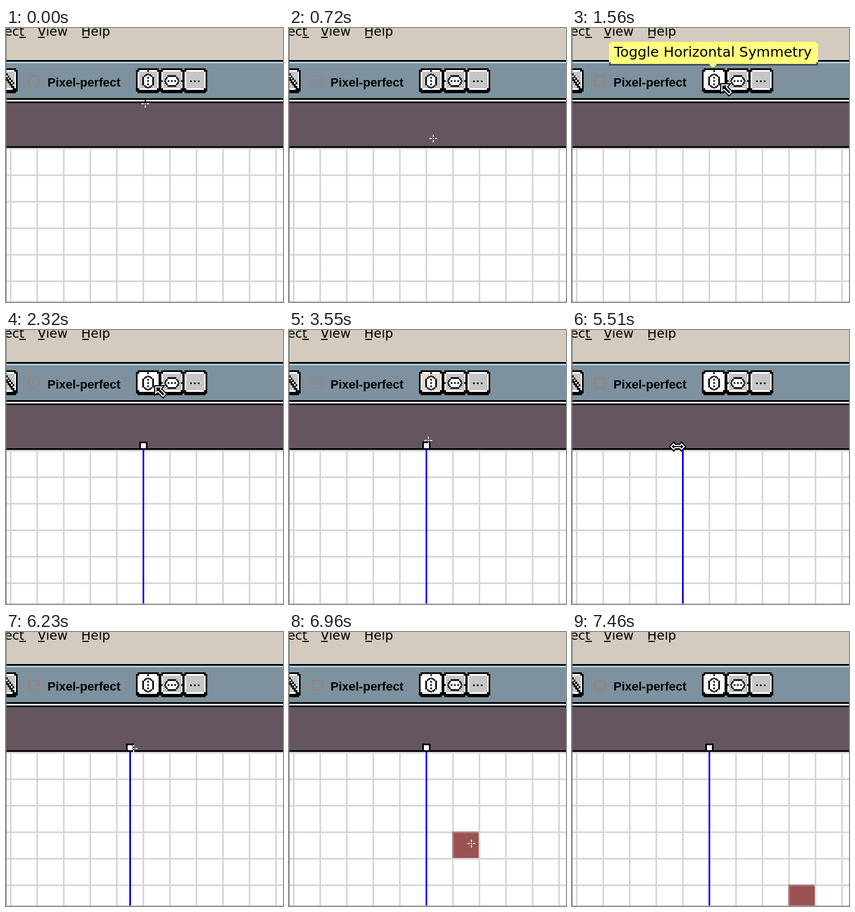
Write an HTML page with a canvas that moves like this. It is 501 px wide and 496 px high and loops after 8240 ms.

```html
<!DOCTYPE html>
<html lang="en">
<head>
<meta charset="utf-8">
<title>Symmetry line</title>
<style>
html, body { margin: 0; width: 100%; height: 100%; overflow: hidden; }
canvas { display: block; }
</style>
</head>
<body>
<canvas id="stage" width="501" height="496"></canvas>
<script>
const W = 501, H = 496, LOOP = 8240, TICK = 120, CELL = 48, TOP = 217;
const g = document.getElementById('stage').getContext('2d');

// Each gesture eases the pointer from where it was to `to`, swinging out by `bend` on the way.
const gestures = [
  { start: 0, ticks: 1, to: [252, 137] },
  { start: 120, ticks: 7, to: [224, 168], bend: [193, 175] },
  { start: 960, ticks: 6, to: [268, 100] },
  { start: 2320, ticks: 1, to: [268, 100] },
  { start: 2570, ticks: 1, to: [268, 100] },
  { start: 2950, ticks: 7, to: [252, 203] },
  { start: 3790, ticks: 1, to: [248, 206] },
  { start: 4170, ticks: 7, to: [348, 211], bend: [93, 0] },
  { start: 5010, ticks: 4, to: [198, 211] },
  { start: 5510, ticks: 7, to: [231, 211], bend: [-75, 0] },
  { start: 6350, ticks: 3, to: [246, 211] },
  { start: 6840, ticks: 4, to: [365, 454] },
  { start: 7340, ticks: 2, to: [425, 504] }
];

// Time of the latest tick and the pointer's place at it
function pointerAt(time) {
  const i = gestures.findLastIndex(m => m.start <= time);
  const { start, ticks, to, bend = [0, 0] } = gestures[i];
  const from = i ? gestures[i - 1].to : to;
  const step = Math.min(ticks - 1, Math.floor((time - start) / TICK));
  const k = (step + 1) / ticks;
  const ease = Math.sin(Math.PI * k / 2), swing = Math.sin(Math.PI * k) ** 2;
  const at = n => Math.round(from[n] + (to[n] - from[n]) * ease + bend[n] * swing);
  return { t: start + TICK * step, x: at(0), y: at(1) };
}

function rect(color, x, y, w, h) {
  g.fillStyle = color;
  g.fillRect(x, y, w, h);
}

// Box with 3 px notches at its corners
function notched(color, x, y, w, h) {
  rect(color, x + 3, y, w - 6, h);
  rect(color, x, y + 3, w, h - 6);
}

function text(str, x, y, font, align = 'left') {
  g.font = font;
  g.textAlign = align;
  g.fillStyle = '#000';
  g.fillText(str, x, y);
}

// Black shape with a white ring inside its black rim
function cursor(points, x, y) {
  g.beginPath();
  points.forEach(([px, py]) => g.lineTo(x + px, y + py));
  g.closePath();
  g.lineWidth = 6;
  g.strokeStyle = g.fillStyle = '#000';
  g.stroke();
  g.fill();
  g.lineWidth = 2;
  g.strokeStyle = '#fff';
  g.stroke();
}

function button(x, fill) {
  notched('#000', x, 73, 44, 45);
  notched('#fff', x + 3, 76, 38, 36);
  rect(fill, x + 6, 79, 33, 30);
}

// Split oval with a dotted axis; flip swaps the axes
function symmetryIcon(cx, cy, flip) {
  const dot = (color, x, y, w, h) => flip
    ? rect(color, cx + y - h / 2, cy + x - w / 2, h, w)
    : rect(color, cx + x - w / 2, cy + y - h / 2, w, h);
  dot('#fff', 0, 0, 19, 18);
  dot('#fff', 0, 0, 12, 24);
  for (const sx of [-1, 1]) {
    dot('#000', sx * 9, 0, 3, 16);
    for (const sy of [-1, 1]) {
      dot('#000', sx * 6, sy * 9, 3, 3);
      dot('#000', sx * 3.5, sy * 11, 3, 3);
    }
  }
  for (let d = -18; d <= 18; d += 6) dot('#000', 0, d, 3, 3);
}

function toolbar(fill) {
  rect('#d3cbbe', 0, 0, W, 58);
  const menu = '23px "DejaVu Sans", sans-serif';
  text('ect', 33, 14, menu, 'right');
  text('View', 57, 14, menu);
  text('Help', 136, 14, menu);
  for (const x of [24, 58, 138]) rect('#000', x, 16, 12, 2);

  rect('#000', 0, 58, W, 3);
  rect('#b0cde0', 0, 61, W, 3);
  rect('#7d929e', 0, 64, W, 63);
  rect('#000', 0, 127, W, 9);
  rect('#fff', 0, 130, W, 3);

  button(-23, '#c6c6c6');
  for (let i = 0; i < 5; i++) {
    rect('#000', 3 * i, 82 + 4 * i, 3, 14);
    rect('#fff', 3 * i, 86 + 4 * i, 3, 3);
  }

  notched('#9c8278', 40, 86, 21, 20);
  rect('#7d929e', 43, 89, 15, 14);
  text('Pixel-perfect', 75, 106, 'bold 22px "Liberation Sans", sans-serif');

  button(320, '#c6c6c6');
  button(278, '#c6c6c6');
  button(235, fill);
  symmetryIcon(257, 96, false);
  symmetryIcon(300, 96, true);
  for (let i = 0; i < 3; i++) rect('#000', 333 + 7 * i, 95, 3, 3);
}

function grid() {
  g.beginPath();
  for (let x = 7; x < W; x += CELL) g.rect(x, TOP, 3, H - TOP);
  for (let y = TOP; y < H; y += CELL) g.rect(0, y, W, 3);
  g.fillStyle = 'rgba(176,176,176,.5)';
  g.fill();
}

// Crosshair, black where it lies on the white stripe
function cross(x, y) {
  for (let d = -7; d < 7; d++) {
    const gap = Math.abs(d + 0.5);
    if (gap > 1 && gap < 3) continue;
    rect(y + d >= 127 && y + d < 134 ? '#000' : '#fff', x - 1, y + d, 2, 1);
    rect('#fff', x + d, y - 1, 1, 2);
  }
}

const arrow = [[3, 3], [14, 3], [11, 7], [20, 16], [16, 20], [7, 11], [3, 14]];
const half = [[-12, 0], [-7, -5], [-5, -2], [5, -2], [7, -5], [12, 0]];
const resize = [...half, ...half.slice(1, -1).map(([x, y]) => [-x, -y])];

function draw(time) {
  const { t, x, y } = pointerAt(time);
  const during = (from, to) => t >= from && t < to;
  const lineOn = t >= 2320;
  const dragging = during(4170, 6230) || during(6350, 6590);
  const resizing = during(3790, 6230) || during(6350, 6840);
  const lineX = during(4170, 6590) ? 8 + 24 * Math.round((x - 8) / 24) : 248;

  toolbar(during(2570, 4170) ? '#e6d9d0' : y < 118 || lineOn ? '#fff' : '#c6c6c6');
  rect('#655560', 0, 136, W, 78);
  rect('#000', 0, 214, W, 3);
  rect('#fff', 0, TOP, W, H - TOP);

  if (y >= TOP) {
    const snap = (v, from) => from + CELL * Math.floor((v - from) / CELL);
    rect('#9b5252', snap(x, 7), snap(y, TOP), CELL, CELL);
  }
  grid();
  rect('#b0b0b0', 0, 495, W, 1);
  rect('#6e6e6e', 0, 0, 1, H);

  if (lineOn) {
    rect('#00f', lineX - 1, TOP - 1, 3, 496 - TOP);
    if (!dragging) {
      rect('#000', lineX - 7, 202, 15, 14);
      rect('#fff', lineX - 4, 205, 9, 9);
    }
  }

  if (during(1560, 2320)) {
    rect('#434e55', 67, 62, 378, 6);
    notched('#ffff7d', 67, 25, 378, 40);
    rect('#ffff7d', 249, 65, 12, 3);
    rect('#ffff7d', 252, 68, 6, 3);
    text('Toggle Horizontal Symmetry', 76, 52, '25.3px "DejaVu Sans", sans-serif');
  }

  if (resizing) cursor(resize, x, y);
  else if (y < 126) cursor(arrow, x, y);
  else cross(x, y);
}

const begin = performance.now();
function loop() {
  draw((performance.now() - begin) % LOOP);
  requestAnimationFrame(loop);
}
loop();
</script>
</body>
</html>
```
